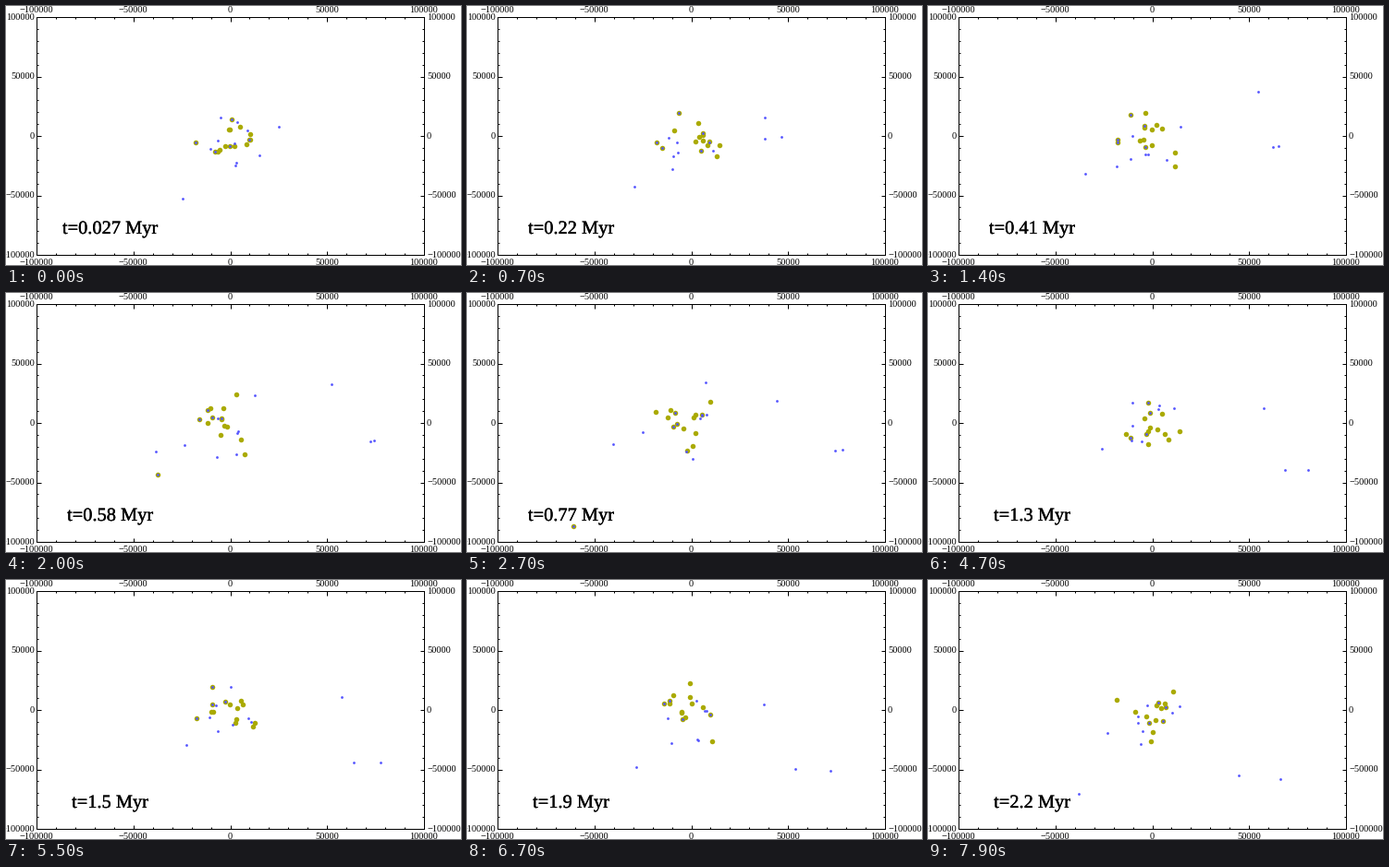
These frames come from a looping animation (492x281 px, 8 s). A matplotlib script:

```python
import numpy as np
import matplotlib
import matplotlib.pyplot as plt
from matplotlib.animation import FuncAnimation
from matplotlib.patheffects import Normal, Stroke
from matplotlib.ticker import MultipleLocator

W, H, DPI = 492, 281, 100
PX = 72 / DPI                      # one pixel in points
FRAMES, INTERVAL = 80, 100
LEFT, RIGHT, TOP, BOTTOM = 33, 452, 12, 270
MID_X, MID_Y = (LEFT + RIGHT) / 2, (TOP + BOTTOM) / 2
LIMIT = 100000
STEP = 0.0274                      # Myr per frame
GOLD, BLUE = "#aaaa00", "#5555ff"
CORE = np.array([245, 142])        # cluster centre in stage pixels

matplotlib.rcParams["font.family"] = "Liberation Serif"
rng = np.random.default_rng(11)


def orbit(smallest, largest):
    """A tilted Kepler-like ellipse around the core; wide orbits are slower."""
    a = rng.uniform(smallest, largest)
    e = rng.uniform(0.1, 0.6)
    b = a * np.sqrt(1 - e * e) * rng.uniform(0.4, 1)
    turn, phase = rng.uniform(0, 2 * np.pi, 2)
    rate = 2 * np.pi / (15 + 1.1 * a) * rng.choice([-1, 1])

    def at(i):
        m = phase + rate * i
        ecc = m + e * np.sin(m) + e * e / 2 * np.sin(2 * m)
        x, y = a * (np.cos(ecc) - e), b * np.sin(ecc)
        return CORE + [x * np.cos(turn) - y * np.sin(turn),
                       0.85 * (x * np.sin(turn) + y * np.cos(turn))]
    return at


def escape(start, velocity, kick):
    """Rest near the core, then fly off in a straight line."""
    return lambda i: np.add(start, np.multiply(velocity, max(0, i - kick)))


def wander(*keys):
    """A smooth path through a few (frame, x, y) points."""
    keys = np.array(keys, float)
    times, path = keys[:, 0], keys[:, 1:]
    slope = np.gradient(path, times, axis=0)

    def at(i):
        k = min(np.searchsorted(times, i, side="right"), len(times) - 1) - 1
        span = times[k + 1] - times[k]
        u = (i - times[k]) / span
        return ((1 + 2 * u) * (1 - u) ** 2 * path[k]
                + u * (1 - u) ** 2 * span * slope[k]
                + u * u * (3 - 2 * u) * path[k + 1]
                + u * u * (u - 1) * span * slope[k + 1])
    return at


pairs = [escape((205, 148), (-6.9, 8.1), 14)] + [orbit(15, 38) for _ in range(4)]
gold = pairs + [orbit(8, 36) for _ in range(10)]
blue = pairs + [orbit(18, 52) for _ in range(7)] + [
    wander((0, 295, 131), (14, 379, 152), (38, 410, 183), (79, 381, 216)),
    wander((0, 261, 135), (14, 373, 153), (38, 391, 184), (79, 336, 212)),
    wander((0, 274, 162), (14, 357, 93), (27, 335, 117), (55, 363, 127), (79, 264, 144)),
    wander((0, 191, 209), (27, 158, 164), (55, 195, 179), (79, 163, 232)),
]


def positions(group, i):
    x, y = np.array([at(i) for at in group]).T
    return np.column_stack([(x - MID_X) / (RIGHT - MID_X),
                            (MID_Y - y) / (MID_Y - TOP)]) * LIMIT


fig = plt.figure(figsize=(W / DPI, H / DPI), dpi=DPI, facecolor="white")
ax = fig.add_axes([LEFT / W, 1 - BOTTOM / H, (RIGHT - LEFT) / W, (BOTTOM - TOP) / H])
ax.set(xlim=(-LIMIT, LIMIT), ylim=(-LIMIT, LIMIT))
for axis in (ax.xaxis, ax.yaxis):
    axis.set_major_locator(MultipleLocator(50000))
    axis.set_minor_locator(MultipleLocator(10000))
ax.tick_params(which="both", direction="in", top=True, right=True, width=PX,
               labelbottom=False, labelleft=False)
ax.tick_params(which="major", length=4.5 * PX)
ax.tick_params(which="minor", length=2.5 * PX)
for spine in ax.spines.values():
    spine.set_linewidth(PX)


def write(x, y, s, size=10.4, ha="center"):
    return fig.text(x / W, 1 - y / H, s, fontsize=size * PX, ha=ha, va="baseline")


for v in range(-LIMIT, LIMIT + 1, 50000):
    s = str(v).replace("-", "\u2212")
    x = MID_X + v / LIMIT * (RIGHT - MID_X)
    y = MID_Y - v / LIMIT * (MID_Y - TOP)
    write(x - 0.5, 7, s)
    write(x - 0.5, 281, s)
    write(31, y + 3, s, ha="right")
    write(455, y + 3, s, ha="left")

clock = write(112.5, 247, "", 20.4)
clock.set_path_effects([Stroke(linewidth=0.3 * PX, foreground="black"), Normal()])
big = ax.scatter([], [], s=(5.5 * PX) ** 2, c=GOLD, linewidths=0, zorder=3)
small = ax.scatter([], [], s=(2.8 * PX) ** 2, c=BLUE, linewidths=0, zorder=4)


def update(i):
    big.set_offsets(positions(gold, i))
    small.set_offsets(positions(blue, i))
    t = f"{STEP * (i + 1):.2g}"
    clock.set_text(f"t={t if '.' in t else t + '.'} Myr")
    return big, small, clock


anim = FuncAnimation(fig, update, frames=FRAMES, interval=INTERVAL,
                     repeat=True, repeat_delay=0, blit=False)
plt.show()
```
